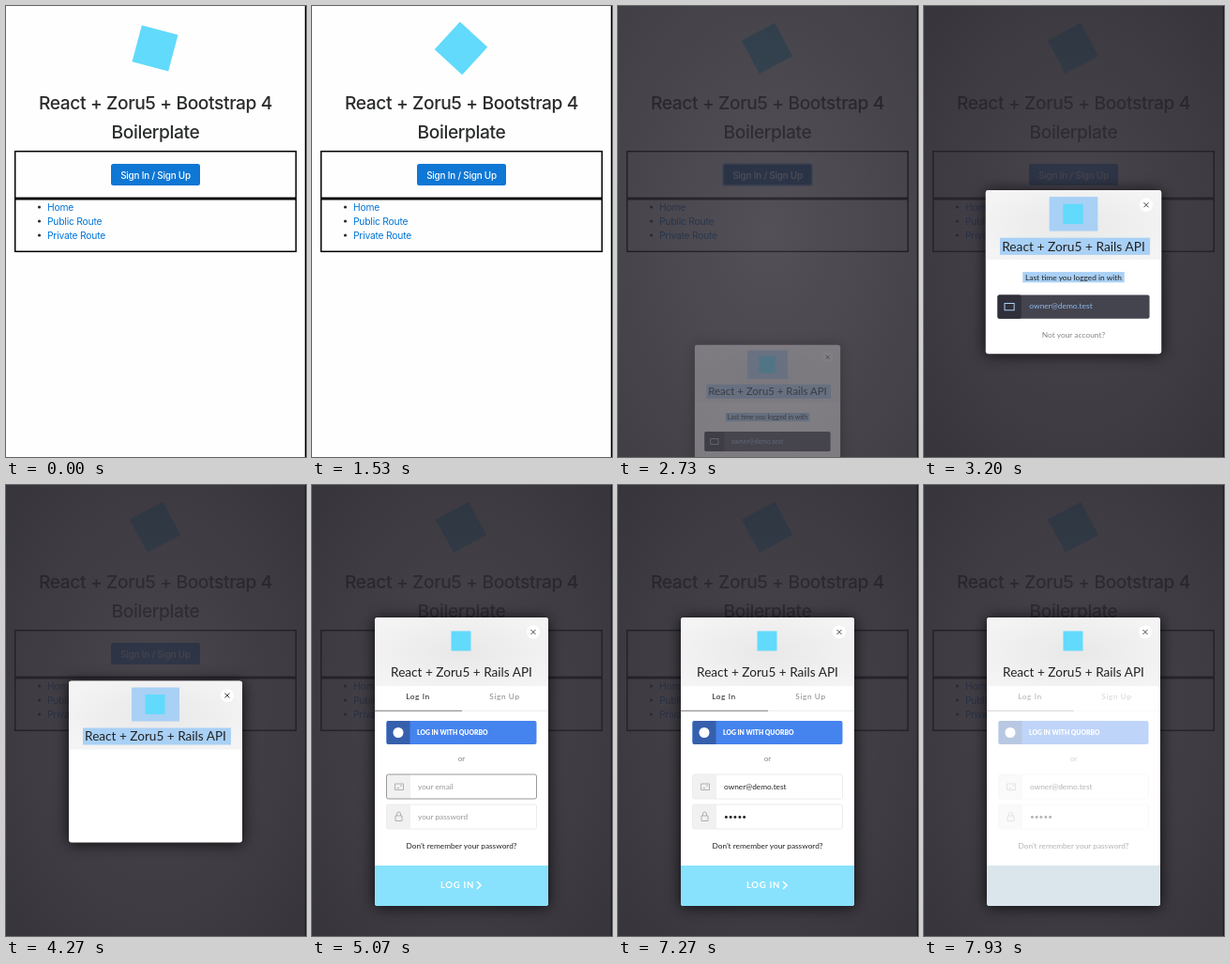
An HTML page that plays this animation: 320 px wide and 480 px high, repeating every 8000 ms.

```html
<!DOCTYPE html>
<html lang="en">
<head>
<meta charset="utf-8">
<title>Sign-in dialog</title>
<style>
  html, body { margin: 0; width: 100%; height: 100%; overflow: hidden; background: #fff; }
  svg { display: block; width: 100vw; height: 100vh; }
  text { dominant-baseline: central; white-space: pre; }
  .page text { font-family: Inter, Roboto, sans-serif; letter-spacing: -.02em; fill: #292b2c; }
  .page .title { font-size: 19.2px; font-weight: 500; }
  .page .button { font-size: 9.9px; font-weight: 500; fill: #fff; }
  .page .link { font-size: 10.3px; fill: #0275d8; }
  .dialog text { font: 8.3px Lato, "Open Sans", sans-serif; fill: #222; transform: translateY(-.6px); }
  .dialog .title { font-size: 13.6px; }
  .dialog .tab { letter-spacing: .6px; }
  .dialog .social { font-size: 6.8px; font-weight: 900; fill: #fff; }
  .dialog .submit { font-size: 9.6px; font-weight: 700; letter-spacing: .7px; fill: #fff; }
  .dialog .muted { fill: #888; }
  .mid { text-anchor: middle; }
  #card { filter: drop-shadow(0 1px 8px rgba(0, 0, 0, .8)); }
</style>
</head>
<body>
<svg viewBox="0 0 320 480">
  <defs>
    <radialGradient id="dim" r=".707">
      <stop stop-color="#36323b"/><stop offset="1" stop-color="#211e26"/>
    </radialGradient>
    <radialGradient id="headFill" r=".6">
      <stop stop-color="#e8e8e8"/><stop offset="1" stop-color="#f4f4f4"/>
    </radialGradient>
    <clipPath id="cardClip"><rect id="clipShape" x="67" width="185" rx="3"/></clipPath>
  </defs>

  <g class="page">
    <rect width="320" height="480" fill="#fefefe"/>
    <rect id="logo" x="139" y="25" width="40" height="40" fill="#61dafb"/>
    <text class="title mid" x="159.5" y="103">React + Zoru5 + Bootstrap 4</text>
    <text class="title mid" x="159.5" y="134">Boilerplate</text>
    <g fill="none" stroke="#000" stroke-width="1.5">
      <rect x="9.7" y="154.7" width="299.6" height="49.6"/>
      <rect x="9.7" y="205.7" width="299.6" height="55.6"/>
    </g>
    <rect id="signIn" x="112" y="168" width="95" height="23" rx="2.5" stroke-width="1.6"/>
    <text class="button mid" x="159.5" y="179.5">Sign In / Sign Up</text>
    <g fill="#292b2c">
      <circle cx="35.5" cy="214" r="1.6"/><circle cx="35.5" cy="229" r="1.6"/><circle cx="35.5" cy="244" r="1.6"/>
    </g>
    <text class="link" x="44" y="213.5">Home</text>
    <text class="link" x="44" y="228.5">Public Route</text>
    <text class="link" x="44" y="243.5">Private Route</text>
    <rect x="318.8" width="1.2" height="480"/>
  </g>

  <rect id="overlay" width="320" height="480" fill="url(#dim)"/>

  <g class="dialog" id="dialog">
    <rect id="card" x="67" width="185" rx="3" fill="#fff"/>
    <!-- Everything inside is laid out from the top edge of the card. -->
    <g clip-path="url(#cardClip)">
      <g id="content">
        <rect x="67" width="185" height="73" fill="url(#headFill)"/>
        <g id="selection" fill="#a9d0f5">
          <rect x="134" y="7" width="51" height="36"/>
          <rect x="82" y="50" width="158" height="18"/>
        </g>
        <rect x="148.5" y="14.5" width="21" height="21" fill="#61dafb"/>
        <text class="title mid" x="159.5" y="59">React + Zoru5 + Rails API</text>
        <circle cx="236" cy="15.5" r="7" fill="#fff"/>
        <path d="M233.5 13l5 5m0-5l-5 5" stroke="#333" stroke-width=".9"/>

        <g id="lastLogin">
          <rect x="106" y="86" width="107" height="11" fill="#a9d0f5"/>
          <text class="mid" x="159.5" y="92">Last time you logged in with</text>
          <rect x="79.5" y="110" width="160" height="25" rx="2" fill="#44444f"/>
          <rect x="79.5" y="110" width="25" height="25" rx="2" fill="#30303a"/>
          <path d="M87 119h10v7h-10z" fill="none" stroke="#a9d0f5"/>
          <text x="113" y="122.5" style="fill:#8fb8ea">owner@demo.test</text>
          <text class="mid muted" x="159.5" y="153">Not your account?</text>
        </g>

        <g id="form">
          <g id="fields">
            <text class="tab mid" x="113" y="85">Log In</text>
            <text class="tab mid muted" x="205.5" y="85">Sign Up</text>
            <path d="M67 99.3h185" stroke="#e9e9e9" stroke-width=".9"/>
            <path d="M67 99.3h93" stroke="#777" stroke-width=".9"/>
            <rect x="79.5" y="110" width="160" height="25" rx="2" fill="#4583ee"/>
            <path d="M104.5 110v25h-23a2 2 0 0 1-2-2v-21a2 2 0 0 1 2-2z" fill="#3660ad"/>
            <circle cx="92" cy="122.5" r="5.5" fill="#fff"/>
            <text class="social" x="112" y="122.5">LOG IN WITH QUORBO</text>
            <text class="mid muted" x="159.5" y="151">or</text>
            <g fill="#f1f1f1">
              <rect x="80" y="167" width="25" height="26"/><rect x="80" y="199" width="25" height="26"/>
            </g>
            <g fill="none" stroke="#aaa" stroke-width=".9">
              <path d="M88.5 177h9v6.5h-9zM90.5 181.500h2.500M94 179h2"/>
              <path d="M89 211h7v5.5h-7zM90.5 211v-2a2 2 0 0 1 4 0v2"/>
            </g>
            <rect id="emailBox" x="79.5" y="167" width="160" height="26" rx="2" fill="none"/>
            <rect id="passBox" x="79.5" y="199" width="160" height="26" rx="2" fill="none"/>
            <text id="email" x="113" y="180.5"></text>
            <text id="pass" x="113" y="212.5"></text>
            <text class="mid" x="159.5" y="244">Don't remember your password?</text>
          </g>
          <rect x="67" y="264" width="185" height="43" fill="#dae6ec"/>
          <g id="submit">
            <rect x="67" y="264" width="185" height="43" fill="#88e2fd"/>
            <text class="submit mid" x="155" y="285.5">LOG IN</text>
            <path d="M176 281l4 4-4 4" fill="none" stroke="#fff" stroke-width="1.5"/>
          </g>
        </g>
      </g>
    </g>
  </g>
</svg>
<script>
const LOOP = 8000, EMAIL = 'owner@demo.test', CENTER_X = 159.5, CENTER_Y = 294.5;
const el = {};
document.querySelectorAll('[id]').forEach(node => el[node.id] = node);

const set = (name, attrs) => {
  for (const key in attrs) el[name].setAttribute(key, attrs[key]);
};
const ramp = (t, from, to) => Math.min(1, Math.max(0, (t - from) / (to - from)));
const smooth = x => x * x * (3 - 2 * x);
const fade = (t, from, to) => smooth(ramp(t, from, to));

// Overshooting cubic-bezier(.3, 0, 0, 1.4)
function spring(x) {
  let low = 0, high = 1;
  for (let i = 0; i < 24; i++) {
    const s = (low + high) / 2;
    if (.9 * (1 - s) ** 2 * s + s ** 3 < x) low = s; else high = s;
  }
  return 4.2 * low ** 2 - 3.2 * low ** 3;
}

function typed(name, value, hint) {
  el[name].textContent = value || hint;
  el[name].style.fill = value ? '#222' : '#999';
}

function render(t) {
  set('logo', { transform: `rotate(${15 + Math.min(t, 2600) * .018} 159 45)` });

  const pressed = t > 1850 && t < 2900;
  set('signIn', { fill: pressed ? '#025aa5' : '#0f77d4', stroke: pressed ? '#7fb8ea' : 'none' });
  set('overlay', { opacity: .9 * fade(t, 1980, 2850) });

  const rise = spring(ramp(t, 2593, 3593));
  const height = 172 + 135 * fade(t, 4380, 4800);
  const top = CENTER_Y - height / 2;
  set('dialog', {
    opacity: ramp(t, 2593, 3050),
    transform: `translate(${CENTER_X} ${CENTER_Y + 172 * (1 - rise)}) scale(${.8 + .2 * rise}) translate(${-CENTER_X} ${-CENTER_Y})`
  });
  set('card', { y: top, height });
  set('clipShape', { y: top, height });
  set('content', { transform: `translate(0 ${top})` });

  set('selection', { opacity: t < 4400 ? 1 : 0 });
  set('lastLogin', { opacity: 1 - fade(t, 3950, 4200) });
  set('form', { opacity: fade(t, 4600, 4930) });

  typed('email', EMAIL.slice(0, Math.floor(ramp(t, 5100, 6100) * EMAIL.length)), 'your email');
  typed('pass', '•'.repeat(Math.floor(ramp(t, 6810, 7130) * 5)), 'your password');
  const focus = t < 5070 || t >= 7270 ? '' : t < 6800 ? 'emailBox' : 'passBox';
  for (const box of ['emailBox', 'passBox']) set(box, { stroke: box === focus ? '#999' : '#ececec' });

  const sending = fade(t, 7330, 7800);
  set('fields', { opacity: 1 - .66 * sending });
  set('submit', { opacity: 1 - sending });
}

function tick() {
  render(performance.now() % LOOP);
  requestAnimationFrame(tick);
}
tick();
</script>
</body>
</html>
```
